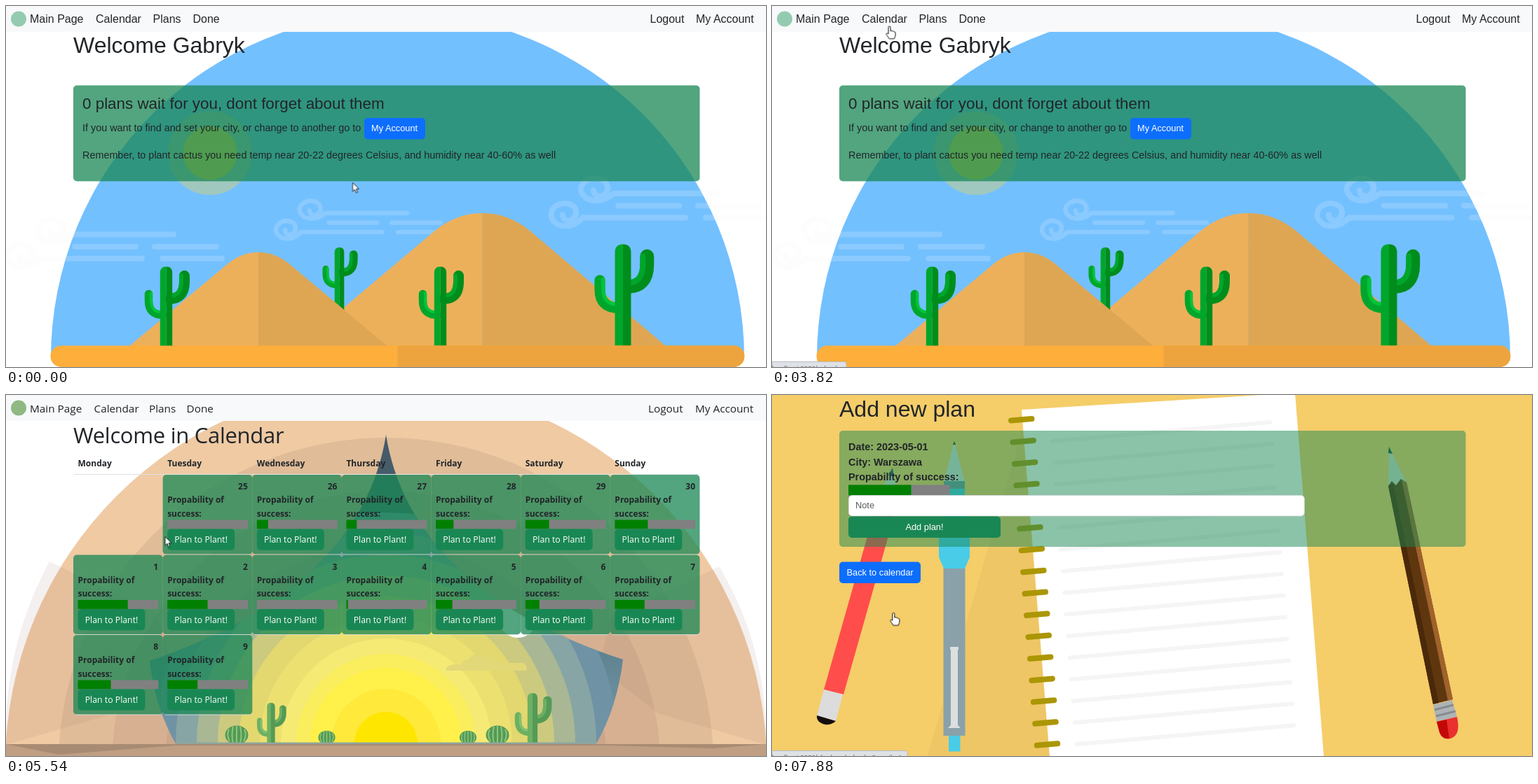
An HTML page that plays this animation: 1084x516 px, repeating every 8 s.

```html
<!DOCTYPE html>
<html lang="en">
<head>
<meta charset="utf-8">
<title>Cactus planner</title>
<style>
html, body { margin: 0; width: 100%; height: 100%; overflow: hidden; background: #fff; }
svg { display: block; }
text { fill: #212529; font-family: "Liberation Sans", Arial, sans-serif; font-size: 12.8px; }
.h1 { font-size: 32px; }
.h3 { font-size: 22.4px; }
.lead { font-size: 14.4px; }
.nav { font-size: 16px; }
.b { font-weight: 700; }
.w { fill: #fff; }
.mid { text-anchor: middle; }
.end { text-anchor: end; }
.cal text { font-family: "Open Sans", "Noto Sans", sans-serif; font-size: 12px; }
.cal .h1 { font-size: 31px; font-weight: 500; letter-spacing: -.3px; }
.cal .nav { font-size: 15.3px; }
.cal .btn { font-size: 12.3px; }
.desert { --light: #00a62b; --dark: #008d1c; --glow: #00c43a; }
.dusk { --light: #6db062; --dark: #549a55; --glow: #82c272; }
.status text { font-size: 9.6px; fill: #5f6368; }

.cal, .cal-art, .add, .add-art, .status, .beam, .hand { opacity: 0; }
.cal, .cal-art, .bare, .add, .add-art, .arrow, .beam, .hand, .cursor { animation: 8s step-end infinite; }
.cal { animation-name: cal; }
.cal-art { animation-name: calArt; }
.bare { animation-name: bare; }
.add { animation-name: add; }
.add-art { animation-name: addArt; }
.arrow { animation-name: arrow; }
.beam { animation-name: beam; }
.hand { animation-name: hand; }
.cursor { animation-name: move; }
.s1 { animation: s1 8s linear infinite; }
.s2 { animation: s2 8s linear infinite; }
.hover { animation: hover 8s linear infinite; }

@keyframes cal { 54.25%, 100% { opacity: 1; } }
@keyframes calArt { 55.25%, 100% { opacity: 1; } }
@keyframes bare { 0% { opacity: 1; } 55.25%, 100% { opacity: 0; } }
@keyframes add { 95.25%, 100% { opacity: 1; } }
@keyframes addArt { 96.875%, 100% { opacity: 1; } }
@keyframes s1 { 0%, 42.7% { opacity: 0; } 43.5%, 57.75% { opacity: 1; } 59.5%, 100% { opacity: 0; } }
@keyframes s2 { 0%, 85% { opacity: 0; } 86.5%, 100% { opacity: 1; } }
@keyframes hover { 0%, 82.5% { fill: #198754; } 84.5%, 100% { fill: #157347; } }
@keyframes arrow {
  0%, 24%, 32.375%, 66.05% { opacity: 1; }
  19%, 27.5%, 37.5%, 83.66%, 100% { opacity: 0; }
}
@keyframes beam {
  0%, 24%, 32.375%, 100% { opacity: 0; }
  19%, 27.5% { opacity: 1; }
}
@keyframes hand {
  0%, 66.05% { opacity: 0; }
  37.5%, 83.66%, 100% { opacity: 1; }
}
@keyframes move {
  0% { transform: translate(494.5px, 252.5px); }
  15% { transform: translate(494.5px, 252.5px); animation-timing-function: steps(6, start); }
  19.75% { transform: translate(365.5px, 151.5px); }
  23.25% { transform: translate(361px, 150px); }
  24% { transform: translate(361px, 150px); animation-timing-function: steps(5, start); }
  28.3% { transform: translate(221px, 68.5px); }
  31.5% { transform: translate(221px, 68.5px); animation-timing-function: steps(11, start); }
  41% { transform: translate(167.5px, 28.7px); }
  65.25% { transform: translate(167.5px, 28.7px); animation-timing-function: steps(6, start); }
  70% { transform: translate(227px, 202.5px); }
  74.625% { transform: translate(227px, 202.5px); animation-timing-function: steps(7, start); }
  80.3% { transform: translate(175.5px, 300.5px); }
  82% { transform: translate(175.5px, 300.5px); animation-timing-function: steps(7, start); }
  87.8%, 100% { transform: translate(173.3px, 311.2px); }
}
</style>
</head>
<body>
<svg width="1084" height="516" viewBox="0 0 1084 516">
  <defs>
    <g id="cactus" fill="none" stroke-linecap="round">
      <path d="M-25 39V49Q-25 69 -5 69" stroke="var(--light)" stroke-width="11.5"/>
      <path d="M-21.500 38V49Q-21 64 -8 65" stroke="var(--glow)" stroke-width="4"/>
      <path d="M26 13V22Q26 46 5 46" stroke="var(--dark)" stroke-width="15"/>
      <path d="M21.500 13V22Q21 41 6 42" stroke="var(--light)" stroke-width="6"/>
      <path d="M0 0Q-8.700 0 -8.700 9V115H0Z" fill="var(--light)"/>
      <path d="M0 0Q8.700 0 8.700 9V115H0Z" fill="var(--dark)"/>
    </g>
    <g id="cloud" fill="none" stroke="#f3f5f7" stroke-opacity=".19" stroke-width="8" stroke-linecap="round">
      <path d="M239 326.500H92Q74 342 54 334Q38 322 50 310Q66 299 80 310Q88 322 76 330Q64 332 63 322"/>
      <path d="M98 344H185M212 344H300M223 361H308"/>
      <path d="M194 361H48Q32 378 12 371Q-4 360 7 346Q22 335 36 346Q42 358 31 365Q20 367 19 357"/>
    </g>
    <g id="barrel">
      <ellipse rx="16.500" ry="13.500" fill="#549a55"/>
      <path d="M-11 -8Q-15 0 -10 9M-5 -12Q-8 0 -5 12M0 -13V13M5 -12Q8 0 5 12M11 -8Q15 0 10 9" fill="none" stroke="#8cc67c" stroke-width="2"/>
    </g>
    <linearGradient id="tent" x2="0" y2="1">
      <stop stop-color="#465868"/><stop offset=".3" stop-color="#46646f"/><stop offset="1" stop-color="#7399aa"/>
    </linearGradient>
    <linearGradient id="glow" x2="0" y2="1">
      <stop offset=".55" stop-color="#ff9a2a" stop-opacity="0"/><stop offset="1" stop-color="#ff9226" stop-opacity=".75"/>
    </linearGradient>
    <clipPath id="opening"><path id="flap" d="M542 57C560 170 640 300 880 378Q872 445 842 498H242Q212 445 205 380C444 300 524 170 542 57Z"/></clipPath>
  </defs>

  <g class="desert">
    <path d="M64 504A494.500 494.500 0 0 1 1053 504Z" fill="#73c0ff"/>
    <circle cx="291" cy="210" r="60" fill="#f7d845" opacity=".35"/>
    <circle cx="291" cy="210" r="38.500" fill="#f2da42"/>
    <use href="#cloud"/>
    <use href="#cloud" transform="translate(775 -58.500)"/>
    <use href="#cloud" transform="translate(383 38) scale(.79)"/>
    <path d="M417 486L612 321Q643 296 679.500 296V486Z" fill="#edb05a"/>
    <path d="M941 486L747 321Q716 296 679.500 296V486Z" fill="#dea653"/>
    <use href="#cactus" transform="translate(475.500 345) scale(.78)"/>
    <path d="M176 486L312 372Q334 352 360 352V486Z" fill="#edb05a"/>
    <path d="M544 486L408 372Q386 352 360 352V486Z" fill="#dea653"/>
    <use href="#cactus" transform="translate(228.500 372.500)"/>
    <use href="#cactus" transform="translate(619.500 372.500)"/>
    <use href="#cactus" transform="translate(880 340.500) scale(1.32)"/>
    <rect x="63.500" y="485.500" width="990" height="30.500" rx="15" fill="#fdae3b"/>
    <path d="M558.500 485.500H1038A15 15.250 0 0 1 1038 516H558.500Z" fill="#eda43e"/>

    <rect width="1084" height="37" fill="#f8f9fa"/>
    <circle cx="18" cy="18.500" r="11" fill="#94cbb0"/>
    <g id="navHome"></g>
    <text class="h1" x="96" y="67">Welcome Gabryk</text>
    <rect x="96" y="113.500" width="893.500" height="137" rx="5" fill="#198754" fill-opacity=".75"/>
    <text class="h3" x="109" y="147">0 plans wait for you, dont forget about them</text>
    <text class="lead" x="109" y="179">If you want to find and set your city, or change to another go to</text>
    <rect x="511" y="160" width="87" height="30.500" rx="5" fill="#0d6efd"/>
    <text class="w" x="521" y="179">My Account</text>
    <text class="lead" x="109" y="218">Remember, to plant cactus you need temp near 20-22 degrees Celsius, and humidity near 40-60% as well</text>
  </g>

  <g class="cal">
    <rect width="1084" height="516" fill="#fff"/>
    <g class="cal-art dusk">
      <g id="dunes"></g>
      <path d="M62 238L215 312L238 390L155 455L0 500Q-4 360 62 238ZM1017 245L862 320L846 390L930 455L1084 500Q1086 360 1017 245Z" fill="#8f6a64" opacity=".1"/>
      <use href="#flap" fill="url(#tent)"/>
      <g clip-path="url(#opening)">
        <g id="rings"></g>
        <circle cx="730" cy="320" r="27" fill="#fff"/>
        <path d="M627 394Q628 385 642 385H650Q652 377 660 378Q668 366 681 372Q692 374 693 383H738Q743 385 743 394Z" fill="#e3d878"/>
        <circle cx="542" cy="498" r="225" fill="url(#glow)" clip-path="url(#opening)"/>
      </g>
      <use href="#cactus" transform="translate(378 440) scale(.65)"/>
      <use href="#cactus" transform="translate(751 426) scale(.82)"/>
      <use href="#barrel" transform="translate(329 486)"/>
      <use href="#barrel" transform="translate(701 486)"/>
      <use href="#barrel" transform="translate(457.500 489.500) scale(.73)"/>
      <use href="#barrel" transform="translate(659 489.500) scale(.73)"/>
      <rect y="499" width="1084" height="17" fill="#bf9e82"/>
      <path d="M0 499H1084L1010 505L860 501H242L75 514Z" fill="#a88b73"/>
      <rect x="242" y="496.500" width="600" height="2.500" fill="#8fa59d"/>
    </g>
    <rect width="1084" height="37" fill="#f8f9fa"/>
    <g class="bare" id="navBare"></g>
    <g class="cal-art">
      <circle cx="18" cy="18.500" r="11" fill="#8fb883"/>
      <g id="navCal"></g>
    </g>
    <g id="navRight"></g>
    <text class="h1" x="96" y="69">Welcome in Calendar</text>
    <rect x="96" y="113" width="893.500" height="1" fill="#dee2e6"/>
    <g id="days"></g>
  </g>

  <g class="add">
    <rect width="1084" height="516" fill="#fff"/>
    <g class="add-art">
      <rect width="1084" height="516" fill="#f5cd69"/>
      <path d="M357 50L222 516H396Z" fill="#eec666"/>
      <path d="M356 21L746 -3L787 516H396Z" fill="#fff"/>
      <g id="sheet" fill="none" stroke-linecap="round"></g>

      <path d="M172 104L180 152L152 146Z" fill="#d8e0d2"/>
      <path d="M172 104L174 117L166 114Z" fill="#24505a"/>
      <path d="M152 146L180 152L102 428L74 421Z" fill="#ff4d4b"/>
      <path d="M74 421L101 428L91 466L64 458Z" fill="#dcdcdc"/>
      <path d="M64 458L91 466Q85 472 76 471Q63 468 64 458Z" fill="#140d0d"/>

      <path d="M260 66L275 125H245Z" fill="#d4e1df"/>
      <path d="M260 66L262 71H258Z" fill="#173b45"/>
      <rect x="245" y="123" width="30" height="12" fill="#6c98a5"/>
      <path d="M245 134H275Q275 175 282 205V232L275 248H245L238 232V205Q245 175 245 134Z" fill="#48cce8"/>
      <rect x="244.500" y="248" width="31" height="239" fill="#8aa1a9"/>
      <rect x="252" y="487" width="16.500" height="22.500" fill="#48cce8"/>
      <path d="M254 360H266V364H265V472L269 476H251L255 472V364H254Z" fill="#dcdfe0"/>

      <path d="M880 74L905 125L879 133Z" fill="#d3ddcb"/>
      <path d="M880 74L885 84L879 83Z" fill="#1d4a4a"/>
      <path d="M879 130L884 123L890 129L897 120L905 125L971 435L943 442Z" fill="#5e370f"/>
      <path d="M879 130L886 127L951 440L943 442Z" fill="#4a290a"/>
      <path d="M898 121L905 125L971 435L964 437Z" fill="#a0622b"/>
      <path d="M943 443L970 436L977 460L948 467Z" fill="#aeb3b5"/>
      <path d="M945 450L972 443M947 459L975 452" stroke="#868c8f" stroke-width="3"/>
      <path d="M948 467L977 460Q983 486 968 491Q954 493 951 478Z" fill="#e9302f"/>
      <path d="M948 467L962 464L966 491Q954 493 951 478Z" fill="#c40808"/>
    </g>
    <text class="h1" x="96" y="31">Add new plan</text>
    <rect x="96" y="51" width="893.500" height="166" rx="5" fill="#198754" fill-opacity=".5"/>
    <g class="b">
      <text class="lead" x="109" y="79">Date: 2023-05-01</text>
      <text class="lead" x="109" y="101">City: Warszawa</text>
      <text class="lead" x="109" y="122">Propability of success:</text>
    </g>
    <rect x="109" y="128.500" width="144.500" height="15" fill="gray"/>
    <rect x="109" y="128.500" width="89.500" height="15" fill="green"/>
    <rect x="109.400" y="143.500" width="650" height="29.500" rx="5" fill="#fff" stroke="#ced4da" stroke-width=".8"/>
    <text x="119" y="162" style="fill:#595c5f">Note</text>
    <rect x="109" y="173.500" width="217" height="30.500" rx="5" fill="#198754"/>
    <text class="w mid" x="217.500" y="193">Add plan!</text>
    <rect x="96" y="238.500" width="116" height="30.500" rx="5" fill="#0d6efd"/>
    <text class="w" x="106.500" y="258">Back to calendar</text>
  </g>

  <g class="status s1">
    <path d="M0 508.500H103Q106 508.500 106 512V517H0Z" fill="#dee1e6" stroke="#b9bcc1"/>
    <text x="0" y="521">localhost:8080/calendar</text>
  </g>
  <g class="status s2">
    <path d="M0 508.500H190Q193 508.500 193 512V517H0Z" fill="#dee1e6" stroke="#b9bcc1"/>
    <text x="0" y="521">localhost:8080/plan/new/calendar?month=1</text>
  </g>

  <g class="cursor">
    <path class="arrow" d="M0 0V12.500L3 9.800L5 14.600L7 13.700L5 9H9Z" fill="#fff" stroke="#111" stroke-width=".9"/>
    <path class="beam" d="M-2.500 -6H-.5Q0 -6 0 -5V5Q0 6 -.5 6H-2.500M2.500 -6H.5M2.500 6H.5" fill="none" stroke="#56a08a"/>
    <path class="hand" d="M-1.500 1Q0 -1 1.500 1V7Q3 5.600 4.300 7.300Q6 6.400 6.900 8.200Q8.600 8 8.600 10V13Q8 15.500 7 18H-.5Q-2 15 -4.600 11.500Q-4.500 9 -1.500 11Z" fill="#fff" stroke="#111" stroke-width="1"/>
  </g>
</svg>
<script>
const fill = (id, parts) => { document.getElementById(id).innerHTML = parts.join(''); };
const text = (x, y, s, cls) => `<text x="${x}" y="${y}" class="${cls}">${s}</text>`;
const rect = (x, y, w, h, rest) => `<rect x="${x}" y="${y}" width="${w}" height="${h}" ${rest}/>`;
const circle = (r, color, cy) => `<circle cx="542" cy="${cy}" r="${r}" fill="${color}"/>`;

const links = ['Main Page', 'Calendar', 'Plans', 'Done'];
const account = ['Logout', 'My Account'];
const nav = (names, xs, y) => names.map((s, i) => text(xs[i], y, s, 'nav'));
fill('navHome', [...nav(links, [34, 128, 209.5, 266.5], 24), ...nav(account, [918.5, 984], 24)]);
fill('navBare', nav(links, [10, 101, 180, 233.5], 25));
fill('navCal', nav(links, [34, 125.5, 204, 257.5], 25));
fill('navRight', nav(account, [916, 983], 25));

fill('dunes', ['#efcaa3', '#e0bc98', '#d6b091', '#cba68a', '#c29c83']
  .map((c, i) => circle(543 - 76 * i, c, 528)));
fill('rings', [[330, '#6f93a5'], [300, '#87a5a5'], [270, '#a9b795'], [240, '#ccca7f'], [210, '#e2d86f'],
  [180, '#ece070'], [150, '#f5ea74'], [128, '#fbee5e'], [108, '#fff04a'], [78, '#ffe93a'], [45, '#ffe600']]
  .map(([r, c]) => circle(r, c, 498)));

// Calendar: 25 April (a Tuesday) onward
const colW = 893.5 / 7, rowH = 114.5;
const names = ['Monday', 'Tuesday', 'Wednesday', 'Thursday', 'Friday', 'Saturday', 'Sunday'];
const chances = [0, .14, .13, .22, .295, .41, .62, .5, 0, .02, .205, .175, .37, .41, .375];
const cell = (chance, i) => {
  const slot = i + 1, x = 96 + slot % 7 * colW, y = 114 + Math.floor(slot / 7) * rowH;
  const left = x + 6.5, barW = colW - 12.8, day = i < 6 ? 25 + i : i - 5;
  return rect(x, y, colW, 113.7, 'rx="5" fill="#198754" fill-opacity=".75"')
    + rect(x + 3, y + 113.5, colW - 6, 1, 'fill="#dee2e6" fill-opacity=".8"')
    + text(x + colW - 6.5, y + 21, day, 'b end')
    + text(left, y + 40, 'Propability of', 'b') + text(left, y + 59.5, 'success:', 'b')
    + rect(left, y + 64.5, barW, 12.8, 'fill="gray"')
    + rect(left, y + 64.5, barW * chance, 12.8, 'fill="green"')
    + rect(left, y + 77.5, 96, 30.3, `rx="5" fill="#198754" ${day === 1 ? 'class="hover"' : ''}`)
    + text(left + 48, y + 97, 'Plan to Plant!', 'w btn mid');
};
fill('days', [...names.map((s, i) => text(102.5 + i * colW, 102, s, 'b')), ...chances.map(cell)]);

// Notebook lines and spiral
const rows = (n, x, y, d, style) => Array.from({ length: n }, (_, i) =>
  `<path d="M${x + 2.45 * i} ${y + 30.95 * i}${d}" ${style}/>`);
fill('sheet', [...rows(15, 400, 66, 'l310 -27', 'stroke="#f5f5f5" stroke-width="6"'),
  ...rows(16, 341, 36.5, 'l29.500 -2.500', 'stroke="#ab9604" stroke-width="8"')]);
</script>
</body>
</html>
```
